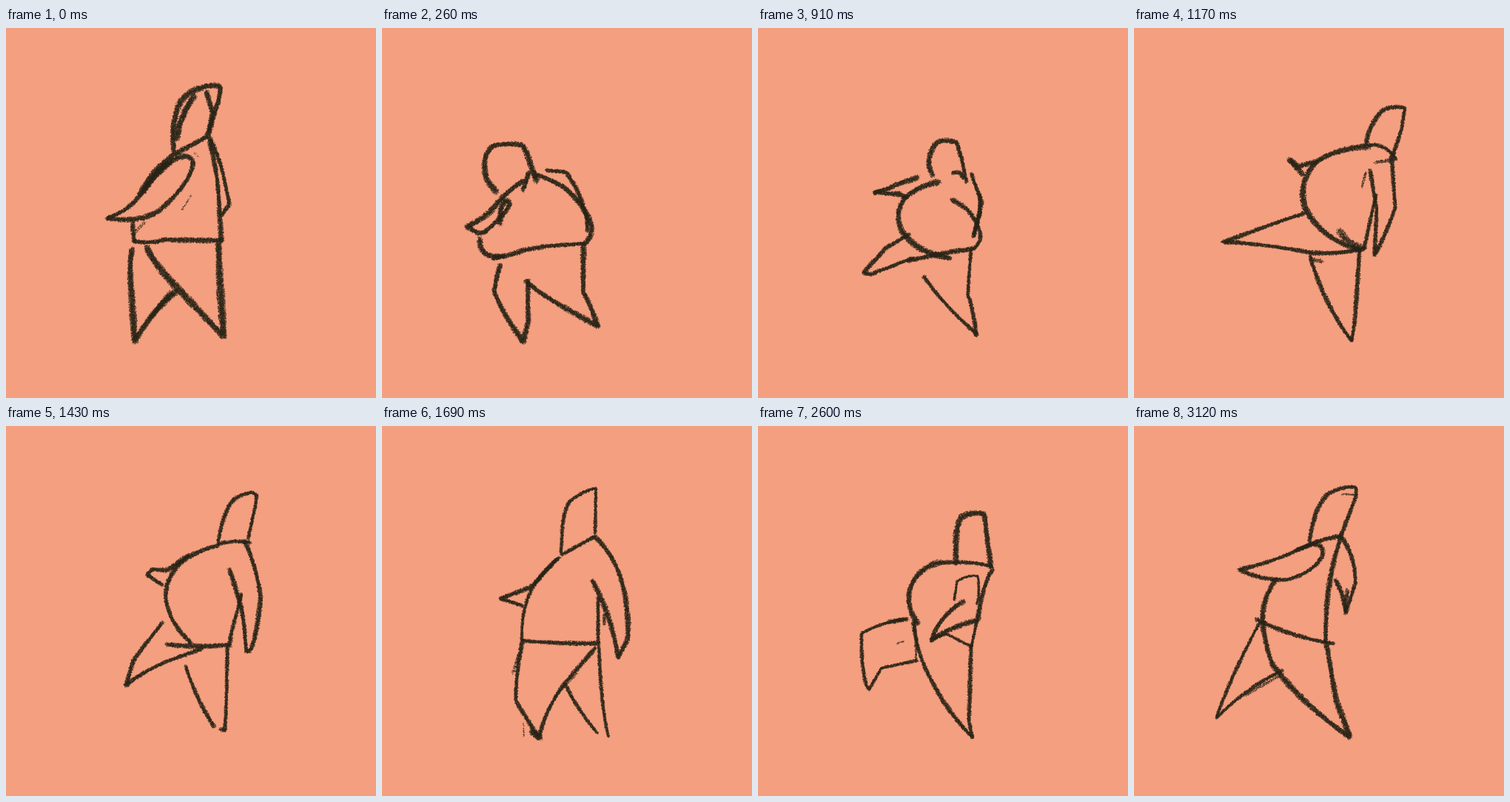
An HTML page with a canvas for the animation above (3250 ms loop, 500x500 px).

```html
<!DOCTYPE html>
<html lang="en">
<head>
<meta charset="utf-8">
<title>Chalk dancer</title>
<style>
html, body { margin: 0; width: 100%; height: 100%; overflow: hidden; background: #f49f7f; }
canvas { display: block; width: 100%; height: 100%; }
</style>
</head>
<body>
<canvas id="stage" width="500" height="500"></canvas>
<script>
const STEP = 130, COUNT = 25, SAMPLES = 120;
const PAPER = '#f49f7f', INK = '#2b271b';
const ctx = document.getElementById('stage').getContext('2d');

// Each pose: step, then [width, path] per part in the order
// head, shoulder, near arm, left side, right side, far arm, hem, left leg, right leg.
// extra: [width, path, density] marks seen only in that one drawing.
const poses = [
  { at: 0, parts: [
    [8, 'M227 166 Q222 135 234 103 Q246 84 262 82 Q278 75 289 79 Q291 90 283 110 L272 147'],
    [7, 'M271 147 L229 170'],
    [7, 'M228 170 Q195 193 178 230 Q160 250 136 257 Q190 265 215 240 Q250 207 253 182 Q249 168 228 177 Q205 190 182 226'],
    [6, 'M171 262 L173 289'],
    [7, 'M275 152 Q287 200 288 240 L291 288'],
    [6, 'M275 148 Q291 180 297 215 L302 238 L291 253'],
    [7, 'M173 288 Q195 292 214 286 Q250 287 292 287'],
    [9, 'M171 299 Q166 310 169 350 L174 424 Q195 385 230 356'],
    [10, 'M190 296 Q200 320 238 358 L294 417 L289 340 L287 290']],
    extra: [[10, 'M230 150 Q234 122 254 92', 1], [7, 'M271 86 L279 115 L274 140', 1],
      [8, 'M186 222 Q198 200 222 181', 1], [3, 'M238 246 L250 226', .3],
      [4, 'M174 276 L188 262', .4], [3, 'M254 168 L261 174', .4], [8, 'M194 392 L222 358', .8]] },
  { at: 4, parts: [
    [8, 'M104 264 L84 258 Q73 245 74 232 Q76 217 84 217 Q104 217 125 229 L165 256'],
    [9, 'M147 235 L165 256'],
    [8, 'M165 234 L112 261 Q84 282 73 299 Q105 284 136 277 L151 285'],
    [8, 'M113 290 Q106 308 116 322 Q135 336 168 326'],
    [8, 'M155 238 Q180 229 215 230 Q250 238 271 264 Q286 286 258 297'],
    [6, 'M186 229 L222 211 L238 233 L266 283'],
    [6, 'M135 328 Q180 308 208 302 L258 296'],
    [6, 'M155 330 L138 365 Q160 402 196 423 L199 382 L170 324'],
    [5, 'M200 381 Q250 400 306 411 Q285 385 267 363 L256 357 L259 298']],
    extra: [[5, 'M265 298 L270 364', .8], [10, 'M156 324 L173 328', 1],
      [5, 'M112 270 L152 244', .5], [2, 'M145 212 L146 214', .6]] },
  { at: 9, parts: [
    [6, 'M314 158 Q315 135 335 112 Q348 104 366 108 L362 135 L350 172'],
    [5, 'M354 177 Q340 156 318 158'],
    [7, 'M248 180 L222 187 L210 178 L228 198'],
    [8, 'M318 160 Q275 162 248 180 Q222 205 230 240 Q250 284 305 300'],
    [5, 'M327 225 L311 298'],
    [6, 'M348 172 L353 243 Q342 275 325 307 L328 245 L319 192'],
    [7, 'M240 304 Q275 306 312 298'],
    [6, 'M231 250 L195 262 L122 289 Q180 292 240 304'],
    [6, 'M238 308 Q255 370 294 423 L298 400 L305 300']],
    extra: [[9, 'M278 274 Q288 293 308 296', .8], [6, 'M355 177 L326 182', .6],
      [4, 'M313 195 L308 215', .6], [3, 'M118 289 L128 290', 1], [6, 'M239 313 L254 315', .6]] },
  { at: 13, parts: [
    [5, 'M242 172 L243 150 Q244 115 254 102 Q270 88 289 84 L288 145'],
    [5, 'M288 149 L243 174'],
    [6, 'M236 180 Q215 205 200 218 Q180 226 160 233 L190 243'],
    [5, 'M240 178 Q212 198 198 230 Q188 255 189 290'],
    [6, 'M292 232 L292 296'],
    [7, 'M288 150 Q320 180 329 232 Q335 275 331 290 L319 313 Q310 255 284 209'],
    [6, 'M190 290 Q230 294 290 294'],
    [6, 'M190 290 Q180 340 181 372 L212 422 Q220 385 245 350 L288 300'],
    [5, 'M247 348 Q265 385 292 416 M306 420 Q296 380 293 298']],
    extra: [[6, 'M301 254 L300 268', .7], [4, 'M186 306 L177 334', .5], [2, 'M191 400 L192 420', .5],
      [9, 'M202 413 L214 421', .9], [3, 'M232 367 L264 334', .4]] },
  { at: 17, parts: [
    [7, 'M203 271 Q168 265 163 245 Q158 220 174 219 Q195 236 240 246'],
    [5, 'M237 237 L244 248'],
    [5, 'M197 276 Q172 300 182 335 L195 356 L203 318'],
    [8, 'M218 260 Q192 275 199 295 Q204 322 238 321'],
    [7, 'M210 265 Q240 242 308 226 L316 260 L319 288'],
    [5, 'M322 250 Q344 262 338 280 L329 302'],
    [5, 'M238 321 Q280 307 329 302'],
    [5, 'M236 328 L229 360 Q250 395 270 424 L273 380 L316 308'],
    [6, 'M275 376 L292 386 L358 404 L336 352 L331 302']],
    extra: [[7, 'M258 262 Q298 258 306 272 L316 286', 1], [3, 'M262 250 L304 235', .4]] },
  { at: 20, parts: [
    [8, 'M268 186 Q265 140 274 124 Q286 115 306 119 Q309 150 315 190'],
    [6, 'M316 190 Q290 182 246 185'],
    [4, 'M265 235 L269 210 Q285 200 297 203 Q300 225 296 240'],
    [8, 'M246 184 Q214 192 205 222 Q200 245 216 267'],
    [5, 'M296 262 L288 300'],
    [7, 'M317 194 Q303 215 297 262 Q258 272 234 290 Q246 255 278 237'],
    [4, 'M235 288 L255 281 L288 298'],
    [5, 'M201 261 Q170 264 140 280 Q139 320 146 350 L150 356 L167 327 L215 317'],
    [6, 'M210 265 Q215 310 235 345 Q255 385 290 421 L285 400 L288 295']],
    extra: [[2, 'M188 294 L197 291', .6], [4, 'M212 262 L214 318', .6], [6, 'M176 265 L201 261', .8]] },
  { at: 24, parts: [
    [6, 'M237 157 Q243 110 262 92 Q282 80 300 83 L300 95 L279 150'],
    [7, 'M281 149 Q255 151 220 168'],
    [6, 'M240 160 L220 168 Q185 185 142 194 Q170 208 205 208 Q240 200 254 177 Q260 160 240 159'],
    [7, 'M192 207 Q172 235 174 265 Q176 290 186 320'],
    [7, 'M280 150 Q258 210 259 292'],
    [6, 'M282 152 Q300 180 299 213 L286 253 Q283 225 272 208'],
    [6, 'M165 261 Q215 286 270 294'],
    [5, 'M170 265 Q130 340 111 395 Q150 355 201 330'],
    [8, 'M186 320 Q220 370 292 421 L273 370 L260 294']],
    extra: [[3, 'M281 92 L302 93', .6], [6, 'M288 222 L286 250', .8], [4, 'M150 364 L201 335', .5]] }
];

function sample(d) {
  const path = document.createElementNS('http://www.w3.org/2000/svg', 'path');
  path.setAttribute('d', d);
  const len = path.getTotalLength(), out = [];
  for (let i = 0; i <= SAMPLES; i++) {
    const p = path.getPointAtLength(len * i / SAMPLES);
    out.push([p.x, p.y]);
  }
  return out;
}

for (const pose of poses) {
  pose.strokes = pose.parts.map(([width, d]) => ({ width, pts: sample(d) }));
  pose.marks = pose.extra.map(([width, d, density]) => ({ width, density, pts: sample(d) }));
}

function rng(seed) {
  return () => {
    seed = seed + 0x6d2b79f5 | 0;
    let t = Math.imul(seed ^ seed >>> 15, 1 | seed);
    t = t + Math.imul(t ^ t >>> 7, 61 | t) ^ t;
    return ((t ^ t >>> 14) >>> 0) / 4294967296;
  };
}

// A soft core with grains scattered around it; long jumps are pen lifts.
function chalk({ pts, width, density = 1 }, seed) {
  const rand = rng(seed * 7919), phase = rand() * 6.28;
  let run = 0;
  ctx.beginPath();
  pts.forEach(([x, y], i) => {
    const lift = !i || Math.hypot(x - pts[i - 1][0], y - pts[i - 1][1]) > 9;
    lift ? ctx.moveTo(x, y) : ctx.lineTo(x, y);
  });
  ctx.lineWidth = width * .6;
  ctx.globalAlpha = .65 * density * density;
  ctx.stroke();
  ctx.globalAlpha = .7;
  for (let i = 1; i < pts.length; i++) {
    const [x0, y0] = pts[i - 1], [x1, y1] = pts[i];
    const len = Math.hypot(x1 - x0, y1 - y0);
    if (len > 9) continue;
    run += len;
    const w = width * (1 + .14 * Math.sin(run * .045 + phase) + .06 * Math.sin(run * .21));
    const grains = Math.floor(w * len * 1.7 * density + rand());
    for (let k = 0; k < grains; k++) {
      const t = rand(), a = rand() * 6.2832, r = w / 2 * Math.sqrt(rand()), s = .7 + rand() * .6;
      ctx.fillRect(x0 + (x1 - x0) * t + Math.cos(a) * r - s / 2,
                   y0 + (y1 - y0) * t + Math.sin(a) * r - s / 2, s, s);
    }
  }
}

// Smooth curve through the neighbouring poses, with softened tangents.
function blend(step) {
  const n = poses.length;
  let k = n - 1;
  while (poses[k].at > step) k--;
  const cur = poses[k];
  if (cur.at === step) return cur.strokes.concat(cur.marks);
  const prev = poses[(k + n - 1) % n], next = poses[(k + 1) % n], after = poses[(k + 2) % n];
  const gap = (a, b) => (b.at - a.at + COUNT) % COUNT;
  const span = gap(cur, next), u = (step - cur.at) / span;
  const ease = u * u * (3 - 2 * u);
  const leave = .6 * span / gap(prev, next) * u * (1 - u) * (1 - u);
  const arrive = .6 * span / gap(cur, after) * u * u * (u - 1);
  const mix = (p, a, b, c) => a + (b - a) * ease + (b - p) * leave + (c - a) * arrive;
  return cur.strokes.map((s, j) => {
    const p = prev.strokes[j], b = next.strokes[j], c = after.strokes[j];
    return {
      width: s.width + (b.width - s.width) * u,
      pts: s.pts.map((q, i) => [0, 1].map(d => mix(p.pts[i][d], q[d], b.pts[i][d], c.pts[i][d])))
    };
  });
}

function draw(step) {
  ctx.globalAlpha = 1;
  ctx.fillStyle = PAPER;
  ctx.fillRect(0, 0, 500, 500);
  ctx.fillStyle = ctx.strokeStyle = INK;
  ctx.lineCap = ctx.lineJoin = 'round';
  blend(step).forEach((s, j) => chalk(s, step * 31 + j + 1));
}

const start = performance.now();
let shown = -1;
function tick() {
  const step = Math.floor((performance.now() - start) / STEP) % COUNT;
  if (step !== shown) draw(shown = step);
  requestAnimationFrame(tick);
}
tick();
</script>
</body>
</html>
```
